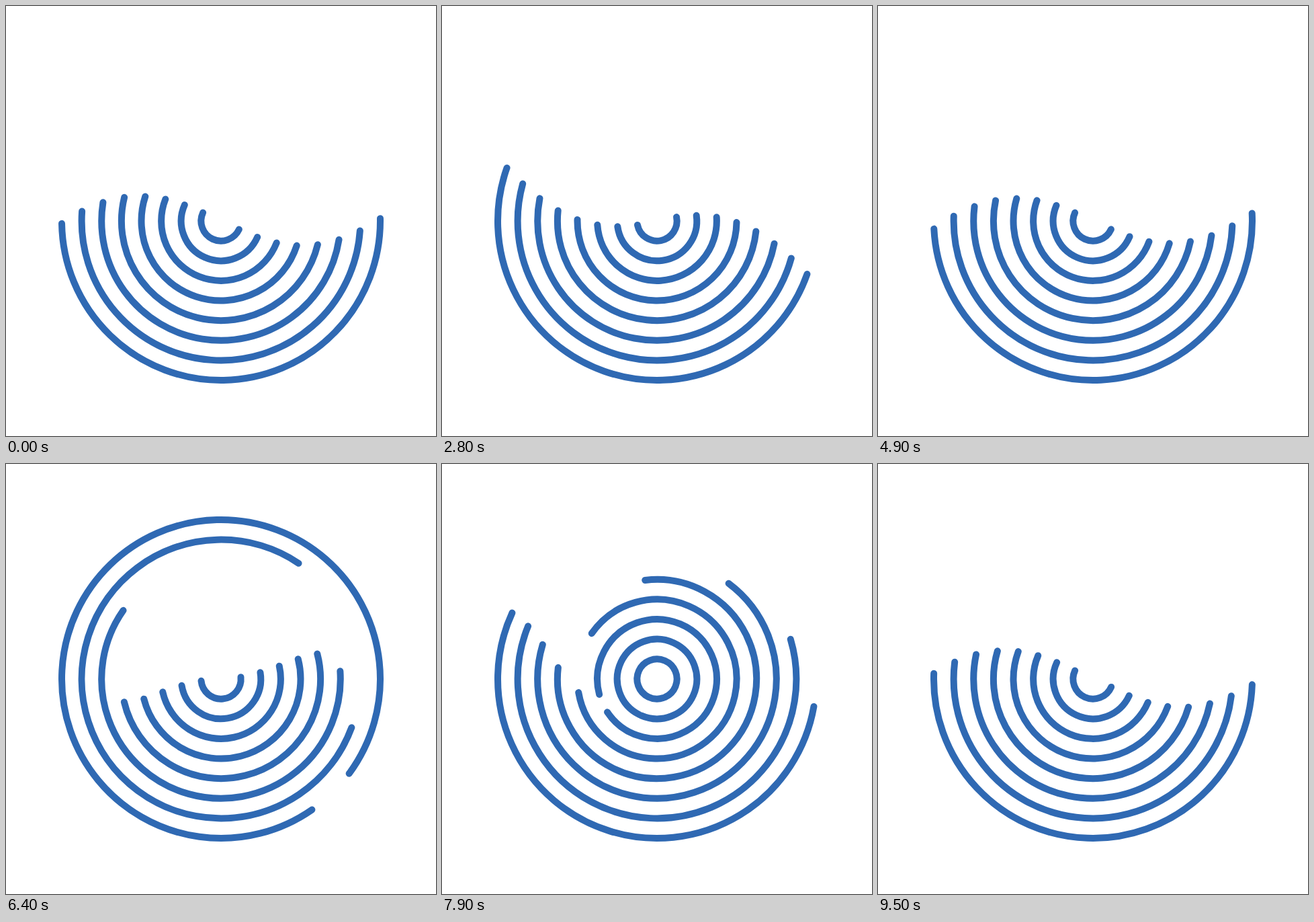
These frames come from a looping animation (640x640 px, 9600 ms). An HTML page:

```html
<!DOCTYPE html>
<html lang="en">
<head>
<meta charset="utf-8">
<title>Swinging arcs</title>
<style>
  html, body { margin: 0; width: 100%; height: 100%; overflow: hidden; background: #fff; }
  svg { display: block; width: 100%; height: 100%; }
  path { fill: none; stroke: #2f69b3; stroke-width: 10; stroke-linecap: round; }
</style>
</head>
<body>
<svg id="stage" viewBox="0 0 640 640"></svg>
<script>
const RINGS = 8, STEP = 29.625, CENTER = 320;
const SWING = 2400, LOOP = 4 * SWING, FIRST = 960, LAG = 200;
const GROW = 800, TICK = 40;
const LOW = -15, HIGH = 25;

const stage = document.getElementById('stage');
const rings = Array.from({ length: RINGS }, () =>
  stage.appendChild(document.createElementNS('http://www.w3.org/2000/svg', 'path')));

const ease = u => u * u * (3 - 2 * u);
const mix = (a, b, u) => a + (b - a) * u;

function point(r, deg) {
  const a = deg * Math.PI / 180;
  return (CENTER + r * Math.cos(a)).toFixed(3) + ' ' + (CENTER + r * Math.sin(a)).toFixed(3);
}

// Two equal pieces, so that a full circle can be drawn too.
function arc(r, start, span) {
  const to = deg => `A${r} ${r} 0 0 1 ${point(r, deg)}`;
  return 'M' + point(r, start) + to(start + span / 2) + to(start + span);
}

// Four swings per loop: up, down, full spin, down.
function pose(t) {
  const local = ((t % LOOP) + LOOP) % LOOP;
  const swing = Math.floor(local / SWING);
  const ms = local - swing * SWING;
  const e = ease(ms / SWING);
  if (swing % 2) return [mix(HIGH, LOW, e), 180];
  if (swing === 0) return [mix(LOW, HIGH, e), 180];
  const extra = ms < GROW ? ease(ms / GROW) : 1 - ease((ms - GROW) / (SWING - GROW));
  return [mix(LOW, HIGH + 360, e), 180 + 180 * extra];
}

function draw(time) {
  const t = Math.floor(time / TICK + 1e-6) * TICK;
  rings.forEach((ring, i) => {
    const delay = FIRST + LAG * (RINGS - 1 - i);
    const [start, span] = pose(t - delay);
    ring.setAttribute('d', arc(STEP * (i + 1), start, span));
  });
}

function frame() {
  draw(performance.now() % LOOP);
  requestAnimationFrame(frame);
}
draw(0);
requestAnimationFrame(frame);
</script>
</body>
</html>
```
